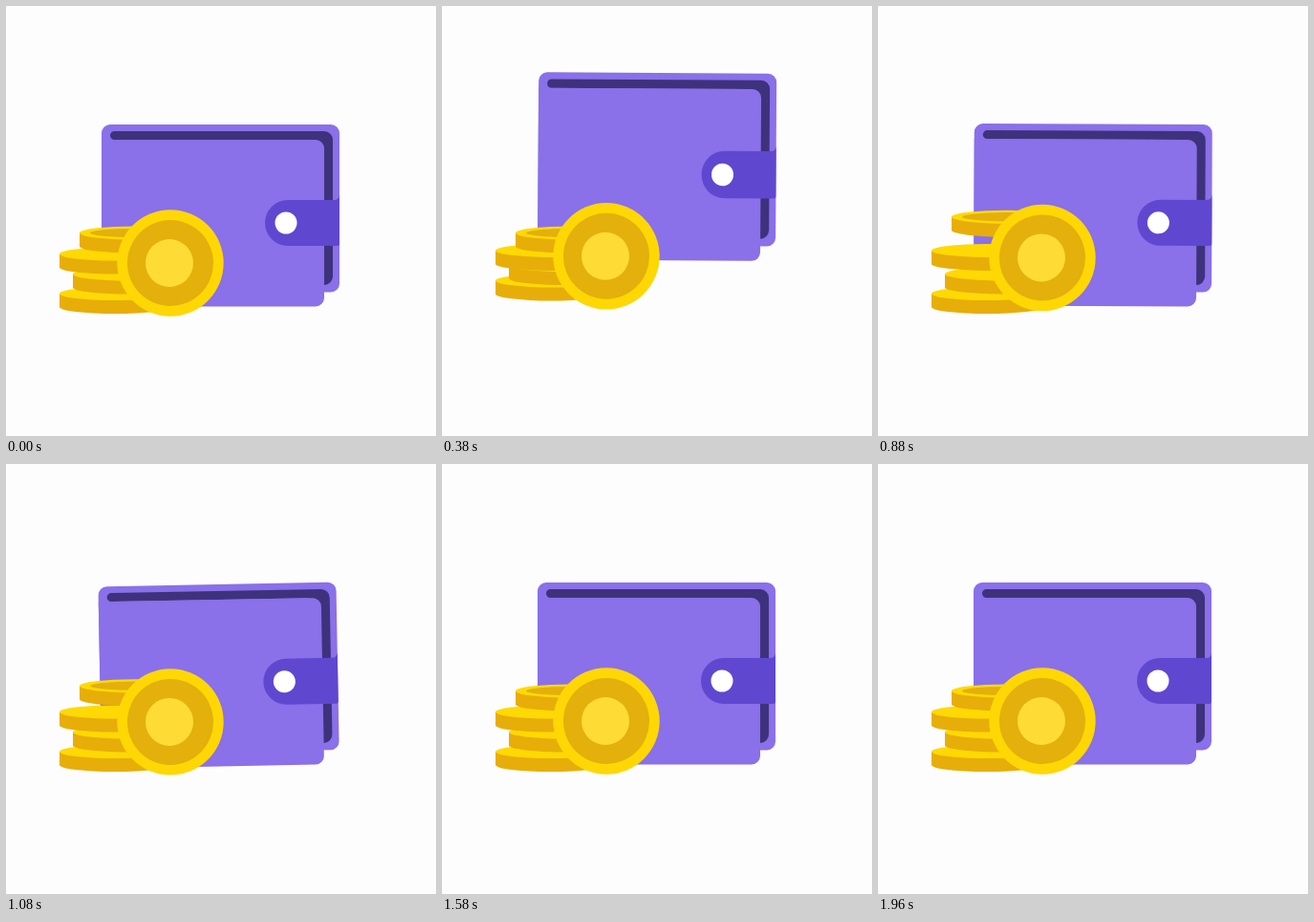
These frames come from a looping animation (450x450 px, 2 s). An HTML page:

```html
<!DOCTYPE html>
<html lang="en">
<head>
<meta charset="utf-8">
<title>Wallet and coins</title>
<style>
  html, body { margin: 0; width: 100%; height: 100%; overflow: hidden; background: #fdfdfe; }
  svg { display: block; width: 100vw; height: 100vh; }
</style>
</head>
<body>
<svg viewBox="0 0 450 450">
  <defs>
    <g id="coin">
      <path d="M-58 0V14A58 7 0 0 0 58 14V0Z" fill="#e7ae0a"/>
      <ellipse rx="58" ry="7" fill="#ffd904"/>
    </g>
    <g id="topCoin">
      <use href="#coin"/>
      <ellipse rx="47" ry="4.6" fill="#e3b00c"/>
    </g>
  </defs>
  <g id="wallet">
    <rect x="100" y="124" width="249" height="175.5" rx="9" fill="#8a70e9"/>
    <path d="M113.500 131H333a9 9 0 0 1 9 9V283a9 9 0 0 1-9 9H320V140H113.500a4.500 4.500 0 0 1 0-9Z" fill="#3f327c"/>
    <path d="M100 140H324a9 9 0 0 1 9 9V305.500a9 9 0 0 1-9 9H109a9 9 0 0 1-9-9Z" fill="#8a70e9"/>
    <path d="M349 197Q349 203 343 203H295a24 24 0 0 0 0 48H347q2 0 2-2Z" fill="#6047cf"/>
    <circle cx="293" cy="227" r="11.500" fill="#fff"/>
  </g>
  <g id="stack"></g>
  <g id="front">
    <circle r="55.700" fill="#ffd704"/>
    <circle r="45" fill="#e3b00c"/>
    <circle cx="-1" r="25" fill="#ffdb36"/>
  </g>
</svg>
<script>
const FPS = 24, LOOP = 2000;
const $ = id => document.getElementById(id);

// Stack from bottom to top: rest position, hop start (in 1/24 s) and height
const coins = [
  { shape: "coin", x: 114, y: 301, start: 1, height: 14 },
  { shape: "coin", x: 128, y: 280.5, start: 3.5, height: 14 },
  { shape: "coin", x: 114, y: 259.5, start: 6, height: 14.5 },
  { shape: "topCoin", x: 135, y: 237.5, start: 11.4, height: 17 }
];
for (const coin of coins) {
  coin.node = document.createElementNS("http://www.w3.org/2000/svg", "use");
  coin.node.setAttribute("href", "#" + coin.shape);
  $("stack").append(coin.node);
}

// Wallet keys: [time, value]
const lift = [[0, 0], [9.5, 48], [20.7, 0]];
const stretch = [[0, 1], [5, 1.03], [9, 1.03], [17, 1.062], [21, 1]];
const tilt = [[4, 0], [17.5, 1.15], [25.5, -1.1], [31.5, 0.12], [36, 0]];

const wave = u => (1 - Math.cos(Math.PI * u)) / 2;

function hop(f, start, length, height) {
  const u = (f - start) / length;
  return u > 0 && u < 1 ? height * wave(2 * u) : 0;
}

function ease(keys, f) {
  const i = keys.findIndex(k => k[0] > f);
  if (i < 0) return keys[keys.length - 1][1];
  if (i === 0) return keys[0][1];
  const [t0, a] = keys[i - 1], [t1, b] = keys[i];
  return a + (b - a) * wave((f - t0) / (t1 - t0));
}

const move = (node, x, y) => node.setAttribute("transform", `translate(${x} ${y})`);

function draw(now) {
  const f = Math.floor((now % LOOP + 4) * FPS / 1000) % (LOOP * FPS / 1000);

  $("wallet").setAttribute("transform",
    `translate(330 ${314 - ease(lift, f)}) rotate(${ease(tilt, f)}) ` +
    `scale(1 ${ease(stretch, f)}) translate(-330 -314)`);

  for (const c of coins) move(c.node, c.x, c.y - hop(f, c.start, 18, c.height));
  move($("front"), 172, 269 - hop(f, 4.7, 20, 18.5) + hop(f, 24, 6, 1.2));
}

const begin = performance.now();
function tick() {
  draw(performance.now() - begin);
  requestAnimationFrame(tick);
}
tick();
</script>
</body>
</html>
```
